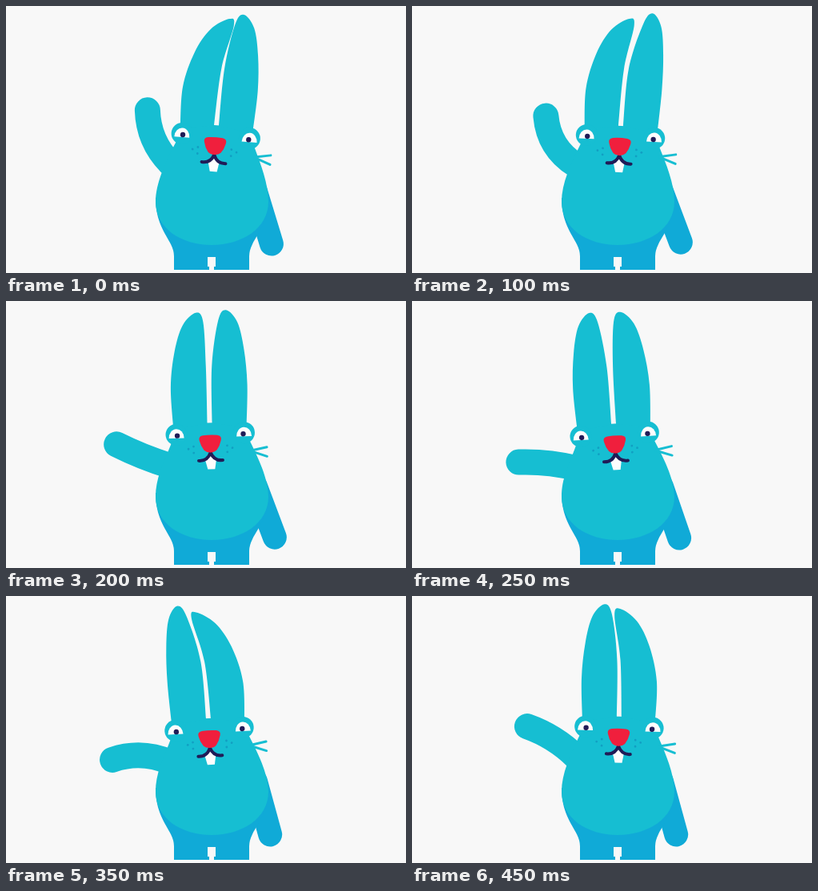
Write an HTML page that moves like this. It is 500x334 px and loops after 500 ms.

```html
<!DOCTYPE html>
<html lang="en">
<head>
<meta charset="utf-8">
<title>Waving rabbit</title>
<style>
  html, body { margin: 0; width: 100%; height: 100%; overflow: hidden; background: #f8f8f8; }
  svg { display: block; width: 100vw; height: 100vh; }
  .skin { fill: #16bed2; }
  .shade { fill: #10aad7; }
  .line { fill: none; stroke: #16bed2; stroke-linecap: round; stroke-linejoin: round; }
  .white { fill: #fdfdfd; }
  .ink { fill: #211c57; }
</style>
</head>
<body>
<svg viewBox="0 0 500 334">
  <path id="rest" class="line" style="stroke: #10aad7" stroke-width="30"/>
  <path class="shade" d="M187 240C187 270 199 284 206 298Q210 306 210 313V330H254V326H252V314H262V326H260V330H304V313Q304 306 308 298C315 284 328 270 328 240Z"/>
  <path id="wave" class="line" stroke-width="32"/>
  <path id="body" class="skin"/>
  <g id="head">
    <path id="earL" class="skin" transform="scale(-1 1)"/>
    <path id="earR" class="skin"/>
    <g id="eyes"></g>
    <path class="line" stroke-width="3" d="M51 21L70.500 17.500M51 22L70.500 29"/>
    <g id="dots" fill="#129fc2"></g>
    <path class="white" d="M-7 31L0 25L7 31L5 43H-4Z"/>
    <path class="line" style="stroke: #211c57" stroke-width="4" d="M-15 32Q-4 33 0 22Q4 33 15 32"/>
    <path fill="#f01f3d" d="M-9 .5Q0-.5 9 .5Q15 1.500 13.500 7Q12 14 8 19Q5 22 0 22Q-5 22-8 19Q-12 14-13.500 7Q-15 1.500-9 .5Z"/>
  </g>
</svg>
<script>
const STEP = 50, STEPS = 10;
// key poses of the wave; a smooth curve fills the steps between
const KEYS = [
  { at: 0, tilt: 4.3, left: -6, right: 24, lift: 67, bend: 14 },
  { at: 2, tilt: 2.8, left: -4, right: 33, lift: 58.5, bend: 18 },
  { at: 5, tilt: -3.5, left: 22, right: 17, lift: 6, bend: -5 },
  { at: 7, tilt: -2.8, left: 32, right: -9, lift: 2.5, bend: -14 },
  { at: 9, tilt: 1.4, left: 22, right: -2, lift: 32, bend: -8 }
];
// ear outline from inner to outer base: upright and folded inwards
const UPRIGHT = [[3, -14], [6, -86], [20, -143], [31, -157], [43, -141], [48, -106], [49, -62], [46, -8]];
const FOLDED = [[3, -14], [0, -86], [-8, -141], [-1, -150], [20, -135], [36, -104], [46, -60], [45, -8]];

const $ = id => document.getElementById(id);
const draw = (id, d) => $(id).setAttribute('d', d);
const rad = deg => deg * Math.PI / 180;

$('eyes').innerHTML = [-42, 42.5].map(x => `<g transform="translate(${x} 0)">
  <circle class="skin" cy="-1.500" r="13.500"/>
  <path class="white" d="M-9.500 3A9.500 11.500 0 0 1 9.500 3Z"/>
  <circle class="ink" cx="${-Math.sign(x)}" r="3.200"/></g>`).join('');

$('dots').innerHTML = [-1, 1].map(side => [[21, 14], [27.5, 17], [21, 22]].map(([x, y]) =>
  `<circle cx="${side * x}" cy="${y}" r="1.400"/>`).join('')).join('');

// key pose by index, wrapping around the loop
function key(i) {
  const turn = Math.floor(i / KEYS.length);
  const k = KEYS[i - turn * KEYS.length];
  return { ...k, at: k.at + turn * STEPS };
}

function poseAt(n) {
  const i = KEYS.findLastIndex(k => k.at <= n);
  const [a, b, c, d] = [-1, 0, 1, 2].map(j => key(i + j));
  const span = c.at - b.at, u = (n - b.at) / span, v = 1 - u;
  const blend = name => {
    const m0 = (c[name] - a[name]) / (c.at - a.at) * span;
    const m1 = (d[name] - b[name]) / (d.at - b.at) * span;
    return v * v * ((1 + 2 * u) * b[name] + u * m0) + u * u * ((3 - 2 * u) * c[name] - v * m1);
  };
  return Object.fromEntries(['tilt', 'left', 'right', 'lift', 'bend'].map(name => [name, blend(name)]));
}

function smooth(p) {
  const at = i => p[Math.max(0, Math.min(p.length - 1, i))];
  let d = 'M' + p[0];
  for (let i = 0; i < p.length - 1; i++) {
    const [a, b, c, e] = [at(i - 1), at(i), at(i + 1), at(i + 2)];
    const c1 = b.map((v, k) => v + (c[k] - a[k]) / 6);
    const c2 = c.map((v, k) => v - (e[k] - b[k]) / 6);
    d += `C${c1} ${c2} ${c}`;
  }
  return d + 'Z';
}

function ear(spread) {
  const u = (spread + 1) / 32;
  return smooth(FOLDED.map((p, i) => p.map((v, k) => v + (UPRIGHT[i][k] - v) * u)));
}

// upper arm and forearm as one curve around the shoulder
function arm(tilt, lift, bend) {
  const x = 205, y = 203.5 - 1.6 * tilt, reach = 72;
  const c = Math.cos(rad(lift)), s = Math.sin(rad(lift));
  const elbow = [x - c * reach / 2 - s * bend, y - s * reach / 2 + c * bend];
  return `M${x} ${y}Q${elbow} ${x - c * reach} ${y - s * reach}`;
}

function show(n) {
  const { tilt, left, right, lift, bend } = poseAt(n);
  const x0 = 257 + 1.14 * tilt, y0 = 166.5 - .55 * tilt;
  const c = Math.cos(rad(tilt)), s = Math.sin(rad(tilt));
  const at = (x, y) => `${x0 + x * c - y * s} ${y0 + x * s + y * c}`;

  $('head').setAttribute('transform', `translate(${x0} ${y0}) rotate(${tilt})`);
  draw('earL', ear(left));
  draw('earR', ear(right));
  draw('body', `M${at(-44, -15)}L${at(45, -15)}L${at(49, 8)}C${at(59, 30)} 328 222 328 245` +
    `C328 278 295 299 257 299C219 299 187 278 187 245C187 222 ${at(-60, 35)} ${at(-49, 10)}Z`);
  draw('wave', arm(tilt, lift, bend));

  const swing = 3.5 * Math.cos(2 * Math.PI * (n - 3) / STEPS);
  draw('rest', `M312 232L${333 + swing} ${297 - swing / 2}`);
}

const start = performance.now();
function tick() {
  const t = Math.max(0, performance.now() - start);
  show(Math.floor(t / STEP) % STEPS);
  requestAnimationFrame(tick);
}
tick();
</script>
</body>
</html>
```
